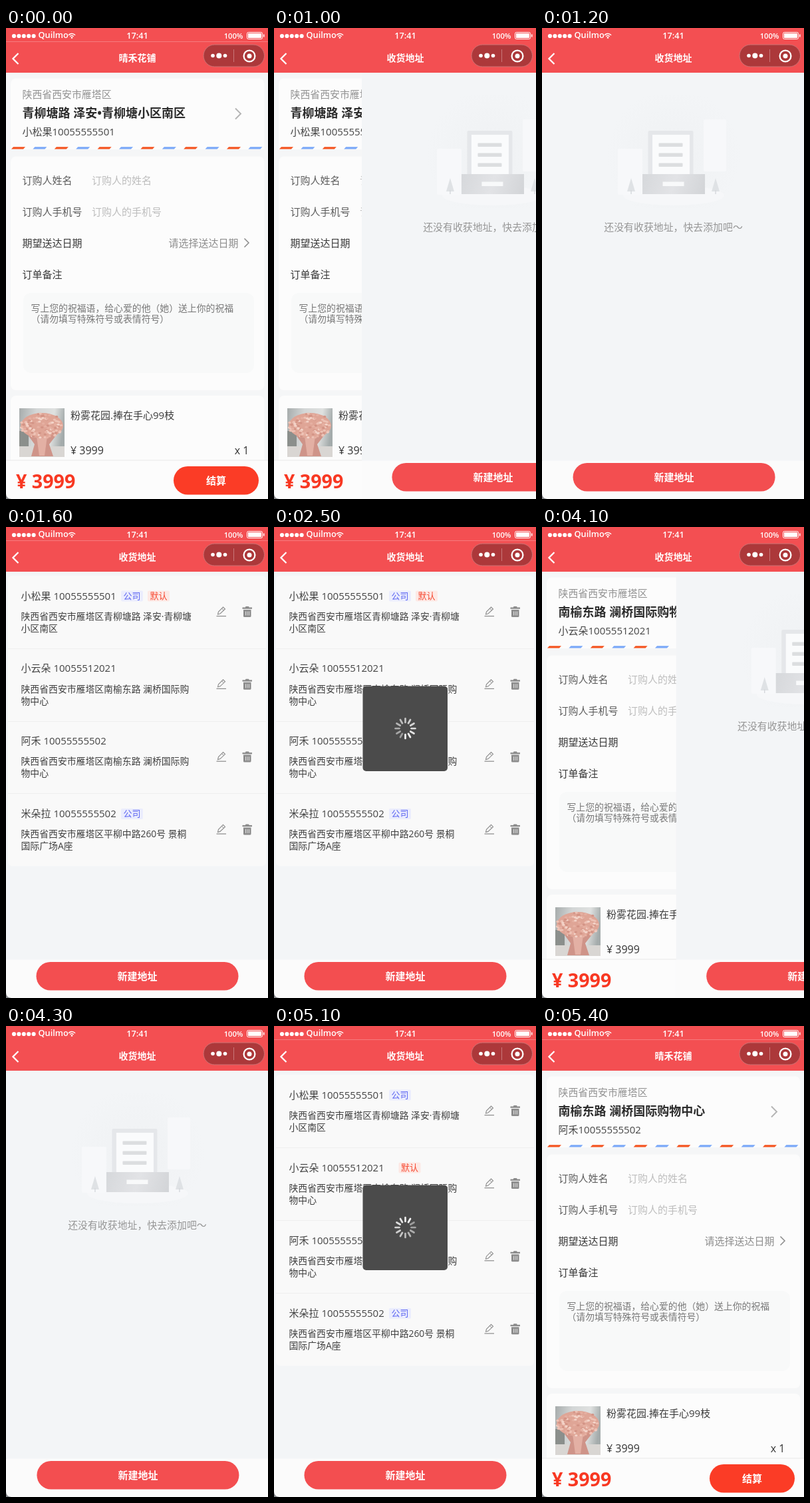
An HTML page with a canvas that plays this animation: 394 px wide and 706 px high, repeating every 6300 ms.

```html
<!DOCTYPE html>
<html lang="zh-CN">
<head>
<meta charset="utf-8">
<style>
html, body { margin: 0; width: 100%; height: 100%; overflow: hidden; background: #f5f6f7; }
canvas { display: block; width: 394px; height: 706px; }
</style>
</head>
<body>
<canvas id="stage"></canvas>
<script>
const W = 394, H = 706, LOOP = 6300, HEADER = 67;
const RED = '#f34f52';
const FONT = '"Open Sans", "Noto Sans CJK SC", "Noto Sans CJK", sans-serif';
const REGION = '陕西省西安市雁塔区';

const canvas = document.getElementById('stage');
const ratio = window.devicePixelRatio || 1;
canvas.width = W * ratio;
canvas.height = H * ratio;
const ctx = canvas.getContext('2d');

const people = [
  { name: '小松果', phone: '10055555501', place: '青柳塘路 泽安•青柳塘小区南区',
    lines: ['青柳塘路 泽安·青柳塘', '小区南区'], office: true },
  { name: '小云朵', phone: '10055512021', place: '南榆东路 澜桥国际购物中心',
    lines: ['南榆东路 澜桥国际购', '物中心'] },
  { name: '阿禾', phone: '10055555502', place: '南榆东路 澜桥国际购物中心',
    lines: ['南榆东路 澜桥国际购', '物中心'] },
  { name: '米朵拉', phone: '10055555502', place: '',
    lines: ['平柳中路260号 景桐', '国际广场A座'], office: true }
];

// Each visit to the address book: slide in, load the list, pick a row, slide out.
const visits = [
  { enter: 890, glide: 360, list: 1400, toast: 2500, leave: 2670, end: 2900, chosen: 0, pitch: 108.8 },
  { enter: 4040, glide: 300, list: 4500, toast: 5100, leave: 5160, end: 5400, chosen: 1, pitch: 109.1 }
];

const clamp = v => Math.min(1, Math.max(0, v));
const easeOut = v => 1 - Math.pow(1 - clamp(v), 3);
const noise = n => { const v = Math.sin(n * 12.9898) * 43758.5453; return v - Math.floor(v); };

// cy is the middle of the glyphs, which suits mixed Chinese and Latin text.
function text(str, x, cy, size, color, align = 'left', weight = 400) {
  ctx.font = `${weight} ${size}px ${FONT}`;
  ctx.textAlign = align;
  ctx.fillStyle = color;
  ctx.fillText(str, x, cy + size * 0.34);
}

function rect(x, y, w, h, color) {
  ctx.fillStyle = color;
  ctx.fillRect(x, y, w, h);
}

function box(x, y, w, h, r, color, border) {
  ctx.beginPath();
  ctx.roundRect(x, y, w, h, r);
  ctx.fillStyle = color;
  ctx.fill();
  if (border) {
    ctx.strokeStyle = border;
    ctx.lineWidth = 1;
    ctx.stroke();
  }
}

function dot(x, y, r, color, ry = r) {
  ctx.beginPath();
  ctx.ellipse(x, y, r, ry, 0, 0, Math.PI * 2);
  ctx.fillStyle = color;
  ctx.fill();
}

function shape(points, color) {
  ctx.beginPath();
  points.forEach(([x, y]) => ctx.lineTo(x, y));
  ctx.fillStyle = color;
  ctx.fill();
}

function line(points, color, width, closed) {
  ctx.beginPath();
  points.forEach(([x, y]) => ctx.lineTo(x, y));
  if (closed) ctx.closePath();
  ctx.strokeStyle = color;
  ctx.lineWidth = width;
  ctx.stroke();
}

function arc(x, y, r, from, to, color, width) {
  ctx.beginPath();
  ctx.arc(x, y, r, from, to);
  ctx.strokeStyle = color;
  ctx.lineWidth = width;
  ctx.stroke();
}

function drawHeader(title, ruled) {
  rect(0, 0, W, HEADER, RED);
  if (ruled) rect(0, 20, W, 1, 'rgba(255,255,255,.25)');
  for (let i = 0; i < 5; i++) dot(12 + i * 7.4, 12, 3.1, '#fff');
  text('Quilmo', 48.5, 11, 12.8, '#fff', 'left', 600);
  for (const r of [3.5, 6.5]) arc(99, 15, r, -Math.PI * 0.78, -Math.PI * 0.22, '#fff', 1.5);
  dot(99, 14.5, 1.3, '#fff');
  text('17:41', 197.5, 11.8, 12.8, '#fff', 'center', 600);
  text('100%', 356.5, 11.8, 11.2, '#fff', 'right', 600);
  ctx.lineWidth = 1;
  ctx.strokeStyle = '#fff';
  ctx.beginPath();
  ctx.roundRect(362.5, 6.5, 23, 10, 2);
  ctx.stroke();
  rect(364, 8, 20, 7, '#fff');
  rect(387, 9.5, 1.5, 4, '#fff');

  line([[18.5, 38], [10.5, 46], [18.5, 54]], '#fff', 2.3);
  text(title, 197.5, 45.5, 14, '#fff', 'center', 600);

  box(297, 25, 91.5, 33, 16.5, '#ac383a', '#cd7274');
  dot(311, 41.5, 2.8, '#fff');
  dot(320.3, 41.5, 4, '#fff');
  dot(329.5, 41.5, 2.8, '#fff');
  rect(342, 32, 1, 19, '#c97779');
  arc(366, 42, 8.4, 0, Math.PI * 2, '#fff', 2.3);
  dot(366, 42, 3.5, '#fff');
}

function drawBouquet() {
  ctx.save();
  ctx.beginPath();
  ctx.rect(20, 570, 68, 73);
  ctx.clip();
  const wall = ctx.createLinearGradient(20, 580, 88, 590);
  wall.addColorStop(0, '#a9aeae');
  wall.addColorStop(0.35, '#d3d6d6');
  wall.addColorStop(0.75, '#dfe1e0');
  wall.addColorStop(1, '#a4abab');
  rect(20, 570, 68, 73, wall);
  rect(20, 604, 14, 24, '#8b8f8c');
  rect(20, 627, 68, 16, '#d9d6d3');
  shape([[30, 606], [79, 606], [65, 624], [71, 642], [38, 642], [43, 624]], '#cf9489');
  shape([[46, 612], [62, 612], [58, 641], [50, 641]], '#e3b0a4');
  dot(54, 596, 32, '#dfa596', 19);
  const tones = ['#edc2b5', '#e6b0a2', '#d39385', '#f3d3c8'];
  for (let i = 0; i < 110; i++) {
    const a = noise(i + 1) * Math.PI * 2, r = Math.sqrt(noise(i + 200));
    dot(54 + Math.cos(a) * r * 32, 596 + Math.sin(a) * r * 19, 2.2, tones[i % 4], 1.6);
  }
  ctx.restore();
}

function drawOrder(person) {
  rect(0, HEADER, W, H - HEADER, '#f5f6f7');
  const card = '#fcfcfc';
  box(7, 75.5, 381.5, 106.5, [8, 8, 0, 0], card);
  text(REGION, 24.5, 99.5, 14.9, '#929292');
  text(person.place, 24.5, 128.3, 18, '#2b2b2b', 'left', 700);
  text(person.name + person.phone, 24.5, 156.3, 15, '#444');
  line([[345, 120.5], [353, 128.5], [345, 136.5]], '#b4b4b4', 1.9);
  for (let i = 0; i < 12; i++) {
    const x = 8 + i * 32.4;
    shape([[x + 3, 178.3], [x + 21, 178.3], [x + 18, 181.6], [x, 181.6]], i % 2 ? '#7aa8f8' : '#f45420');
  }

  box(7, 192.5, 381.5, 350.5, 8, card);
  text('订购人姓名', 24.5, 228.5, 15, '#5c5c5c');
  text('订购人的姓名', 129, 228.5, 15, '#bdbdbd');
  text('订购人手机号', 24.5, 275.5, 15, '#5c5c5c');
  text('订购人的手机号', 129, 275.5, 15, '#bdbdbd');
  text('期望送达日期', 24.5, 322.5, 15, '#383838');
  text('请选择送达日期', 349.5, 322.5, 15, '#8c8c8c', 'right');
  line([[358.5, 315.5], [365, 322], [358.5, 328.5]], '#8c8c8c', 1.5);
  text('订单备注', 24.5, 369.5, 15, '#383838');
  box(26, 397, 347, 120, 12, '#f8f9f9');
  text('写上您的祝福语，给心爱的他（她）送上你的祝福', 37.5, 420, 13.85, '#777');
  text('（请勿填写特殊符号或表情符号）', 37.5, 436, 13.85, '#777');

  box(7, 551, 381.5, 120, 8, card);
  drawBouquet();
  text('粉雾花园.捧在手心99枝', 97, 580.5, 15, '#3c3c3c');
  text('¥ 3999', 97, 633.4, 16, '#333');
  text('x 1', 365.5, 633.4, 16, '#333', 'right');

  rect(0, 648, W, 58, card);
  rect(0, 647.5, W, 1, '#e9e9ea');
  text('¥ 3999', 15, 680, 28.7, '#f83822', 'left', 700);
  box(252, 657, 128, 42.5, 21.2, '#fb3c26');
  text('结算', 316, 679, 15, '#fff', 'center', 700);
}

function drawEmpty() {
  const haze = ctx.createRadialGradient(197, 190, 20, 197, 190, 100);
  haze.addColorStop(0, '#f0f2f4');
  haze.addColorStop(1, '#f3f5f7');
  rect(97, 100, 200, 170, haze);
  dot(197, 251, 76, '#f6f7f9', 15);
  box(113, 181, 37, 69, 2, '#f7f8fa');
  box(242, 137, 34, 78, 2, '#f7f8fa');
  for (const x of [133, 260]) {
    shape([[x, 225], [x + 6, 245], [x - 6, 245]], '#dfe2e5');
    rect(x - 0.7, 243, 1.4, 6, '#d5d8dc');
  }
  box(158.5, 154, 68, 66, 2, '#e5e7ea');
  rect(165, 160, 56, 60, '#fafbfc');
  for (let i = 0; i < 3; i++) box(174.5, 172.5 + i * 15, 36, 5.5, 1, '#dcdee0');
  const tray = ctx.createLinearGradient(150, 219, 244, 249);
  tray.addColorStop(0, '#d6d8db');
  tray.addColorStop(0.5, '#e2e3e6');
  tray.addColorStop(1, '#d2d4d7');
  rect(150, 219, 94, 30, tray);
  rect(180.5, 230.5, 32, 6.5, '#f8f9fa');
  text('还没有收获地址，快去添加吧～', 196.5, 299, 14.9, '#969696', 'center');
}

function drawTag(label, x, cy, color, fill) {
  box(x, cy - 8, 33, 16, 2, fill);
  text(label, x + 16.5, cy, 13, color, 'center');
}

function drawRowIcons(cy) {
  const grey = '#8c8c8c';
  line([[318.5, cy + 4], [319.5, cy], [326.5, cy - 7], [329.5, cy - 4], [322, cy + 3]], grey, 1.1, true);
  line([[324.5, cy - 5], [327.5, cy - 2]], grey, 1);
  rect(316.5, cy + 6, 14.5, 1.2, grey);
  box(360, cy - 8, 5.5, 3, 1, grey);
  rect(355.5, cy - 6.5, 14.5, 2.3, grey);
  box(357, cy - 3, 11.5, 11, [0, 0, 1.5, 1.5], grey);
  for (const x of [360, 362.5, 365]) rect(x, cy - 0.5, 1, 6, '#e2e2e2');
}

function drawList({ pitch, chosen }) {
  box(3, 73, 388, pitch * 4, 6, '#f9f9f9');
  people.forEach((person, i) => {
    const top = 73 + i * pitch;
    if (i) rect(3, Math.round(top), 388, 1, '#efefef');
    text(`${person.name} ${person.phone}`, 22.5, top + 30.5, 15, '#444');
    if (person.office) drawTag('公司', 173, top + 30.5, '#5c65f2', '#ebedfd');
    if (i === chosen) drawTag('默认', person.office ? 213 : 187.5, top + 30.5, '#f6472f', '#fde9e5');
    text(REGION + person.lines[0], 22.5, top + 61, 13.85, '#3f3f3f');
    text(person.lines[1], 22.5, top + 79, 13.85, '#3f3f3f');
    drawRowIcons(top + 54);
  });
}

function drawAddresses(visit, t) {
  rect(0, HEADER, W, H - HEADER, '#f3f5f7');
  if (t < visit.list) drawEmpty();
  else drawList(visit);
  rect(0, 648.5, W, 58, '#fbfbfb');
  box(45.5, 652, 304, 42.5, 21.2, '#f34e50');
  text('新建地址', 197.5, 674, 15, '#fff', 'center', 700);
}

function drawToast(t) {
  box(133.5, 238.5, 127.5, 127.5, 5, '#4b4b4b');
  const lead = Math.floor(t / 1000 * 12);
  ctx.lineCap = 'round';
  for (let i = 0; i < 12; i++) {
    const a = i * Math.PI / 6 - Math.PI / 2;
    const fade = ((lead - i) % 12 + 12) % 12;
    const c = Math.cos(a), s = Math.sin(a);
    line([[197.5 + c * 9, 302 + s * 9], [197.5 + c * 15, 302 + s * 15]],
      `rgba(255,255,255,${0.95 - fade * 0.045})`, 2.7);
  }
  ctx.lineCap = 'butt';
}

function draw(now) {
  const t = Math.floor(now % LOOP / 100) * 100;
  const visit = visits.find(v => t >= v.enter && t < v.end);
  const current = visits.filter(v => t >= v.leave).length;
  const onAddresses = visit && t < visit.leave;

  ctx.setTransform(ratio, 0, 0, ratio, 0, 0);
  drawOrder(people[current]);
  if (visit) {
    const shift = onAddresses
      ? 1 - easeOut((t - visit.enter) / visit.glide)
      : easeOut((t - visit.leave) / 240);
    ctx.save();
    ctx.translate(W * shift, 0);
    drawAddresses(visit, t);
    ctx.restore();
    if (onAddresses && t >= visit.toast) drawToast(t);
  }
  drawHeader(onAddresses ? '收货地址' : '晴禾花铺', !onAddresses || t >= visit.list);

  // Rounded lower-left corner of the phone screen.
  ctx.beginPath();
  ctx.moveTo(0, H - 8);
  ctx.quadraticCurveTo(0.5, H - 0.5, 8, H);
  ctx.lineTo(0, H);
  ctx.fillStyle = '#85878a';
  ctx.fill();
}

const start = performance.now();
function tick() {
  draw(performance.now() - start);
  requestAnimationFrame(tick);
}
tick();
</script>
</body>
</html>
```
